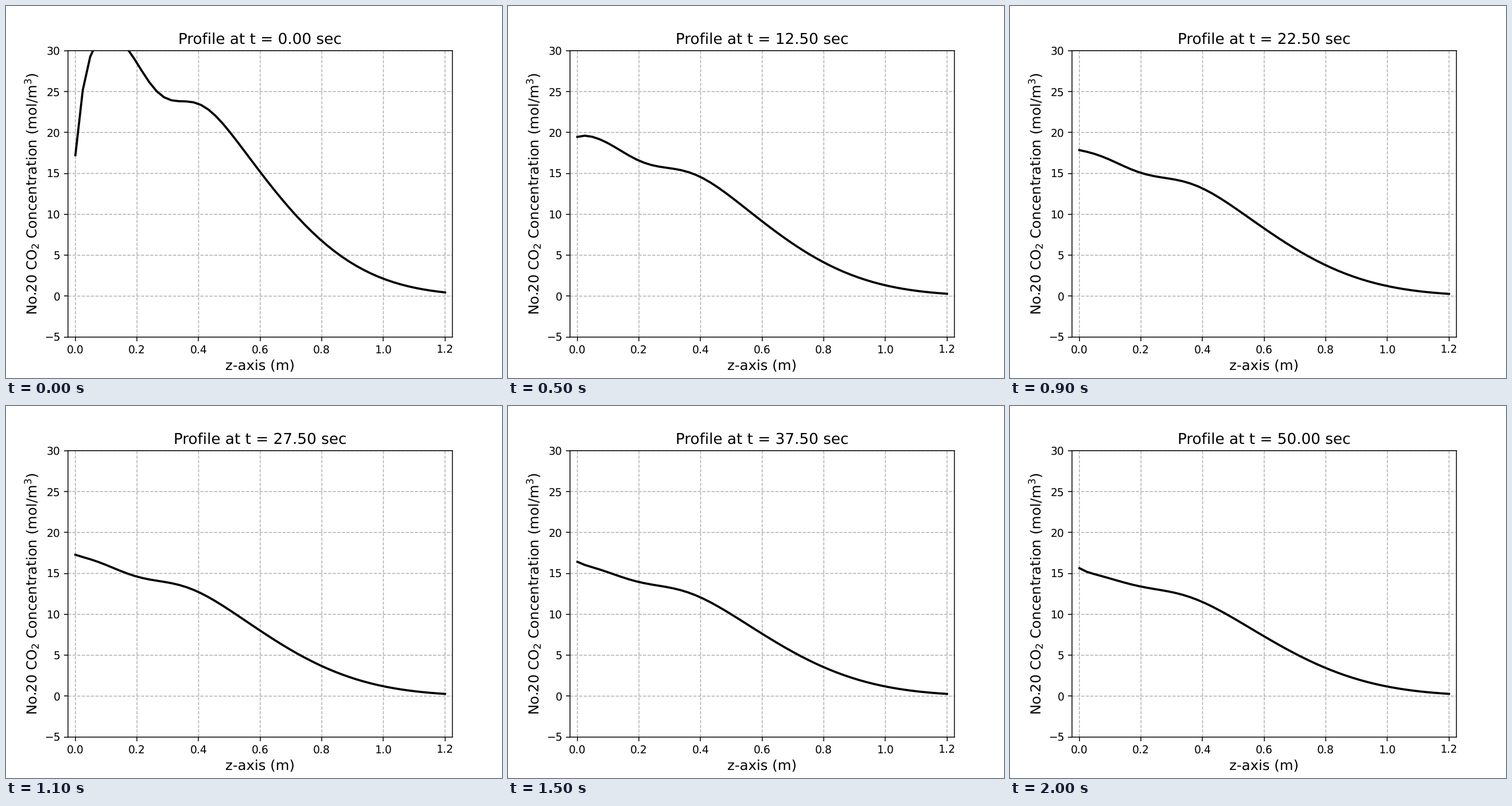
A matplotlib script that plays this animation: 864x648 px, repeating every 2.1 s.

```python
import numpy as np
import matplotlib.pyplot as plt
from matplotlib.animation import FuncAnimation

plt.rcParams.update({
    "font.family": "DejaVu Sans",
    "text.hinting": "none",
    "path.snap": False,
})

LENGTH, STEP, FRAMES = 1.2, 2.5, 21
z = np.linspace(0, LENGTH, 51)


def concentration(t):
    """Falling front with a travelling dip and a layer at the inlet."""
    s = np.log1p(t)
    front = 34 * np.exp(-0.2 * s - (2.77 - 0.0038 * t) * z**2.415)

    depth = 5.42 * np.exp(-0.24 * s - 0.0095 * t)
    center = 0.274 - 0.0227 * s
    width = 0.081 + 0.0068 * s
    dip = depth * np.exp(-0.5 * ((z - center) / width)**2)

    layer = 0.037 * np.exp(-0.15 * s)
    inlet = (0.8 - 17.55 / (1 + t)) * np.exp(-z / layer)
    return front - dip + inlet


fig, ax = plt.subplots(figsize=(6.4, 4.8), dpi=135)
line, = ax.plot([], [], "k-", lw=2)
ax.set_xlim(-LENGTH / 50, LENGTH * 51 / 50)
ax.set_ylim(-5, 30)
ax.set_xlabel("z-axis (m)", fontsize=13)
ax.set_ylabel("No.20 CO$_2$ Concentration (mol/m$^3$)", fontsize=13)
ax.grid(linestyle="--")
title = ax.set_title("", fontsize=14)


def update(i):
    t = STEP * i
    line.set_data(z, concentration(t))
    title.set_text(f"Profile at t = {t:.2f} sec")
    return line, title


anim = FuncAnimation(fig, update, frames=FRAMES, interval=100, repeat=True)
plt.show()
```
